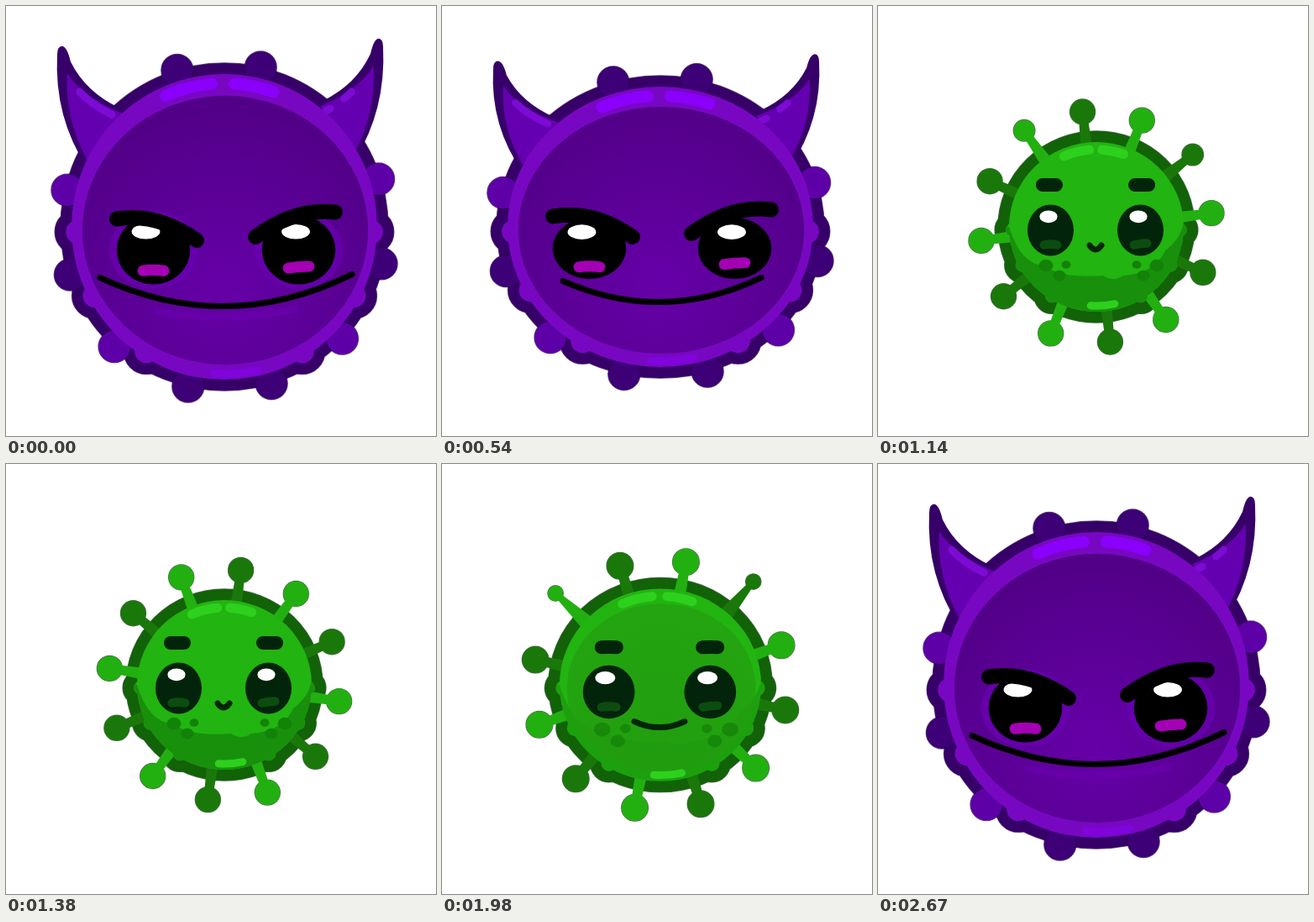
Animation, 512 px wide and 512 px high, one loop 2.7 s. Source, as an HTML page with a canvas:

```html
<!DOCTYPE html>
<html lang="en">
<head>
<meta charset="utf-8">
<title>Germ</title>
<style>
html, body { margin: 0; width: 100%; height: 100%; overflow: hidden; background: #fff; }
canvas { display: block; width: 512px; height: 512px; }
</style>
</head>
<body>
<canvas id="stage" width="512" height="512"></canvas>
<script>
const c = document.getElementById('stage').getContext('2d');
const LOOP = 2700, STEP = 30, CX = 260, CY = 263, DEG = Math.PI / 180;
const BRIGHT = [2, 4, 7, 9];   // places of the light knobs on the purple body
const HORNS = [1, 10];         // places where knobs turn into horns

function ramp(t, a, b) {
  const u = Math.min(1, Math.max(0, (t - a) / (b - a)));
  return u * u * (3 - 2 * u);
}
// 1, then away to 0 from a to b, and back from p to q
const dip = (t, a, b, p, q) => 1 - ramp(t, a, b) + ramp(t, p, q);
const bump = (t, a, b) => t > a && t < b ? Math.sin((t - a) / (b - a) * Math.PI) ** 2 : 0;

function pose(t) {
  const grow = dip(t, 540, 1110, 1790, 2440);
  const peak = dip(t, 0, 450, 2250, 2640);
  return {
    grow, peak,
    green: 1 - dip(t, 870, 1110, 2000, 2200),
    mood: dip(t, 720, 1150, 1980, 2270),
    inner: dip(t, 800, 1100, 1700, 2100),
    horn: dip(t, 930, 1080, 2010, 2130),
    thin: dip(t, 1050, 1200, 1750, 1980),
    turn: 60 * ramp(t, 800, 2100) - 2,
    shift: t > 1500 ? 2 : 0,
    rx: 104 + 78 * grow + 10 * (bump(t, 0, 540) + bump(t, 2350, 2670)),
    ry: 101 + 66 * grow + 15 * peak
  };
}

function mix(p, g, k) {
  const ch = s => [1, 3, 5].map(i => parseInt(s.slice(i, i + 2), 16));
  const b = ch(g);
  return `rgb(${ch(p).map((v, i) => Math.round(v + (b[i] - v) * k))})`;
}

function oval(x, y, rx, ry, fill, alpha = 1) {
  c.globalAlpha = alpha;
  c.fillStyle = fill;
  c.beginPath();
  c.ellipse(x, y, rx, ry, 0, 0, 7);
  c.fill();
  c.globalAlpha = 1;
}

function line(path, width, color, alpha = 1) {
  c.globalAlpha = alpha;
  c.strokeStyle = color;
  c.lineWidth = width;
  c.stroke(path);
  c.globalAlpha = 1;
}

function arc(rx, ry, from, to) {
  const p = new Path2D();
  p.ellipse(CX, CY, rx, ry, 0, (from - 90) * DEG, (to - 90) * DEG);
  return p;
}

function curve(x0, y0, cx, cy, x1, y1) {
  const p = new Path2D();
  p.moveTo(x0, y0);
  p.quadraticCurveTo(cx, cy, x1, y1);
  return p;
}

function rimShape(rx, ry) {
  const p = new Path2D();
  p.ellipse(CX, CY, rx, ry, 0, 0, 7);
  for (const d of [92, 118, 148]) for (const s of [-1, 1]) {
    const x = CX + s * rx * .96 * Math.sin(d * DEG), y = CY - ry * .96 * Math.cos(d * DEG), r = rx * .078;
    p.moveTo(x + r, y);
    p.arc(x, y, r, 0, 7);
  }
  return p;
}

function knob(deg, rx, ry, gap, r, thin, color, edge) {
  const a = deg * DEG, s = Math.sin(a), k = -Math.cos(a);
  const x = CX + s * (rx + gap), y = CY + k * (ry + gap + 3);
  const x0 = CX + s * (rx - 6), y0 = CY + k * (ry - 6);
  const w0 = r * .45 + thin * 5, w1 = r * .34;
  const stem = new Path2D(), ball = new Path2D();
  stem.moveTo(x0 - k * w0, y0 + s * w0);
  stem.lineTo(x - k * w1, y + s * w1);
  stem.lineTo(x + k * w1, y - s * w1);
  stem.lineTo(x0 + k * w0, y0 - s * w0);
  ball.arc(x, y, r, 0, 7);
  line(ball, 1.4, edge, .7);
  c.fillStyle = color;
  c.fill(stem);
  c.fill(ball);
}

// relative to the body centre at full size
const hornOut = new Path2D('M-202-204Q-202-214-196-214Q-190-213-186-196Q-168-160-127-141L-166-70Q-206-130-202-204Z');
const hornIn = new Path2D('M-190-182Q-170-152-122-134L-164-76Q-193-125-190-182Z');
const shineL = new Path2D('M-175-160Q-160-144-136-133');
const shineR = new Path2D('M-162-151Q-158-147-152-143M-135-131L-128-128');

function horn(side, sx, sy, k, alpha) {
  c.save();
  c.translate(CX, CY);
  c.scale(sx * (side < 0 ? 1 : -.95), sy);
  if (side > 0) c.translate(0, -9);
  c.globalAlpha = alpha;
  c.fillStyle = mix('#360068', '#1a5a28', k);
  c.fill(hornOut);
  c.fillStyle = mix('#6500b0', '#22a010', k);
  c.fill(hornIn);
  line(side < 0 ? shineL : shineR, 9, mix('#7c0bd4', '#2cc020', k), alpha);
  c.restore();
}

function drawKnobs({ rx, ry, grow, green, thin, turn, shift }, edge) {
  const gap = 10 + 24 * (1 - grow ** 1.5), r = 15 + 4 * grow;
  for (const odd of [1, 0]) for (let i = odd; i < 12; i += 2) {
    const place = (i + shift) % 12, isHorn = HORNS.includes(place), m = isHorn ? thin : 0;
    if (isHorn && green < .3) continue;
    const color = mix(BRIGHT.includes(place) ? '#5e00a8' : '#3d0076', odd ? '#1a780a' : '#22b010', green);
    knob(15 + 30 * i + turn, rx, ry, gap + 15 * m, r * (1 - .42 * m), m, color, edge);
  }
}

function drawBelly(rim, s, alpha) {
  c.save();
  c.clip(rim);
  c.translate(CX, CY);
  c.scale(s, s);
  c.globalAlpha = alpha;
  c.fillStyle = '#18900c';
  c.fill(new Path2D('M-120-10L-104 0Q-90 45-62 46Q-40 62 8 58Q20 66 32 58Q70 55 82 28Q100 15 104-5L125 0V125H-125Z'));
  c.restore();
}

function drawSpots(s, color, alpha) {
  for (const side of [-1, 1]) for (const [x, y, r] of [[13, -3, 8.5], [-3, 9, 7.5], [-11, -4, 5.5]])
    oval(CX + (side * (53 + x) + 6) * s, CY + (49 + y) * s, r * s, r * s * .85, color, alpha);
}

function drawBody(p) {
  const { rx, ry, grow, green: k, inner } = p;
  const rim = rimShape(rx, ry), s = rx / 104, edge = mix('#1c0038', '#022c02', k);

  line(rim, 27.4, edge, .7);
  line(rim, 26, mix('#360068', '#126208', k));
  const small = .14 * (1 - grow);
  if (p.horn > 0) for (const side of [-1, 1])
    horn(side, rx / 182 * (.985 + small), ry / 181 * (1 + small), k, p.horn);
  drawKnobs(p, edge);

  c.fillStyle = mix('#7807c2', '#22b410', k);
  c.fill(rim);
  if (k > 0) drawBelly(rim, s, k * (1 - .6 * inner));

  const glow = c.createRadialGradient(CX, CY + ry * .4, 0, CX, CY + ry * .4, rx * 1.2);
  glow.addColorStop(0, mix('#6600a8', '#22980f', k));
  glow.addColorStop(1, mix('#520088', '#24a010', k));
  oval(CX + 1, CY + 4, rx * .935, ry * .88, glow, inner);

  const shine = mix('#8b00fa', '#2ed01e', k), inset = 11 - 2 * k;
  for (const [from, to] of [[-24, -5], [4, 20]])
    line(arc(rx - inset, ry - inset, from, to), 14 - 3 * k, shine);
  line(arc(rx - 7, ry - 7, 167, 184), 9, shine, .45 + .55 * k);
  if (k > 0) drawSpots(s, mix('#5c0068', '#138208', k), Math.min(1, k * 2) * (1 - .35 * inner));
}

function drawFace({ grow: g, peak, mood, green: k }) {
  const ink = mix('#000000', '#02240a', k), tilt = 4 * (1 - k), mid = CX + 2 - 3 * k;
  const ex = 53.5 + 33 * g, ey = 267 + 21.5 * g + 2 * peak;
  const ew = 27.5 + 16.3 * g, eh = 30.5 + 6 * g + 4.5 * peak, q = ew / 44;
  const mw = 7 + 111 * g + 32 * peak, my = 285 + 40.5 * g ** .4 - 4 * peak;
  const low = my + 5 + 22 * g ** 1.5 + 9 * peak;
  const bo = 63 + 30 * g + 37 * mood, boY = 213 + 25 * g + 8.5 * mood + 3 * peak;
  const bi = 47 + 20 * g - 32 * mood, biY = 213 + 25 * g + 35 * mood + 4 * peak;
  const bend = Math.max(0, (bo - bi - 16) * .26);

  if (peak > 0) {
    for (const side of [-1, 1]) oval(mid + side * ex, ey, ew + 9, eh + 5, '#6800b0', peak * .8);
    line(curve(mid - 82, low + 6, mid, low + 21, mid + 82, low + 4), 8, '#6c00b0', peak * .6);
  }
  line(curve(mid - mw, my + tilt / 2, mid, 2 * low - my, mid + mw, my - tilt / 2), 7, ink);

  for (const side of [-1, 1]) {
    const x = mid + side * ex, py = ey + eh * .54 - side * tilt * .4;
    oval(x, ey, ew, eh, ink);
    oval(x - (side < 0 ? 9 : 3.5) * g - 2.5 * k, ey - eh * .53, 17 * q, 5 + 3.8 * q, '#fff');
    line(curve(x - 12.5 * q, py + 1, x, py - 1, x + 12.5 * q, py - side), 13 * Math.max(q, .8),
      mix('#a400b4', '#0d4c10', k));
    const oy = boY - side * tilt, iy = biY - side * tilt / 2;
    line(curve(mid + side * bo, oy, mid + side * (bo + bi) / 2, (oy + iy) / 2 - bend, mid + side * bi, iy),
      16 + 2 * mood, ink);
  }
}

function draw(now) {
  const p = pose(Math.floor(now % LOOP / STEP) * STEP);
  c.fillStyle = '#fff';
  c.fillRect(0, 0, 512, 512);
  c.lineCap = 'round';
  drawBody(p);
  drawFace(p);
}

const start = performance.now();
function tick() {
  draw(performance.now() - start);
  requestAnimationFrame(tick);
}
tick();
</script>
</body>
</html>
```
